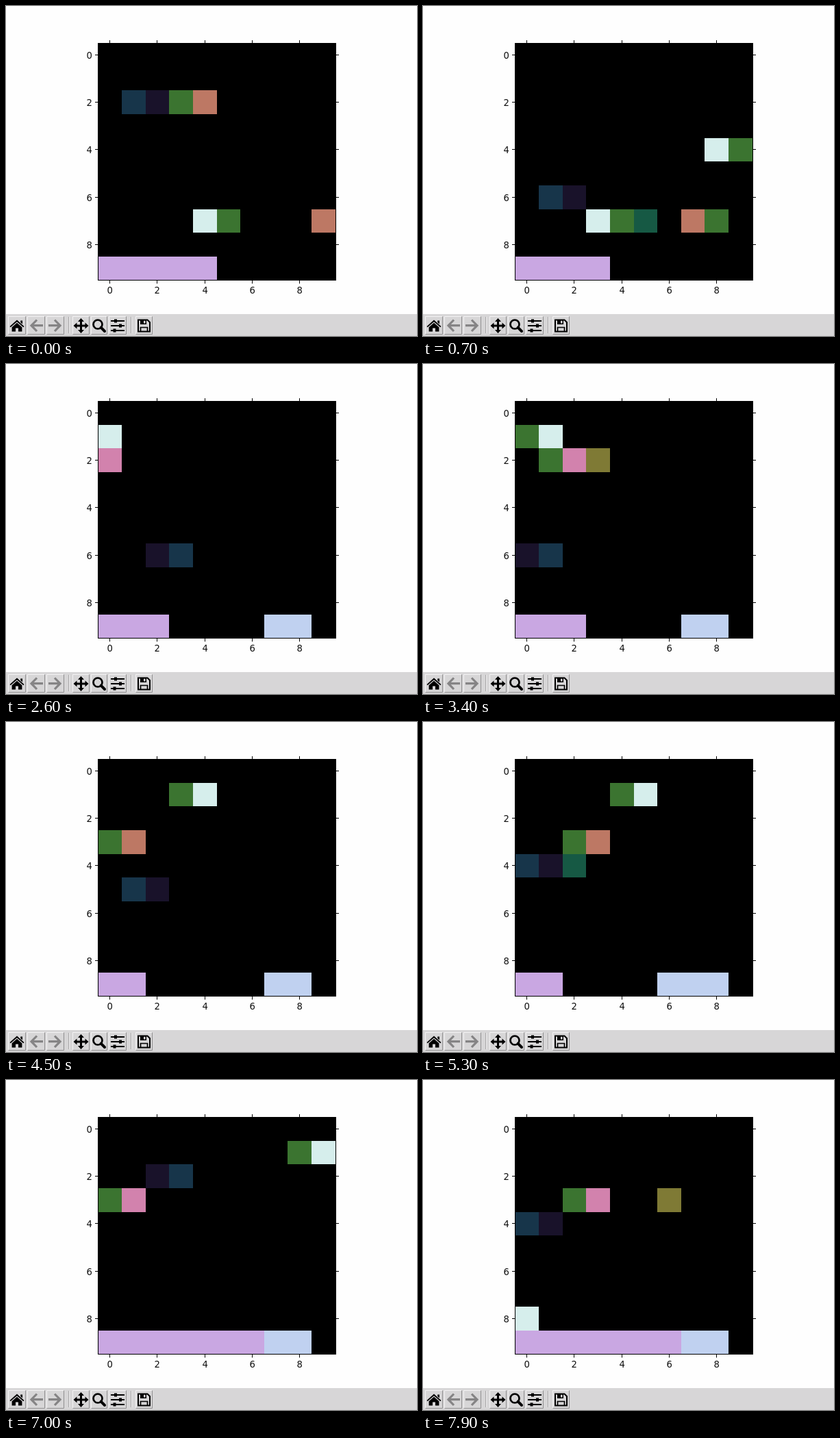
Animation, 600 px wide and 482 px high, one loop 8 s. Source, as an HTML page:

```html
<!DOCTYPE html>
<html lang="en">
<head>
<meta charset="utf-8">
<title>Grid game</title>
<style>
html, body { margin: 0; width: 100%; height: 100%; overflow: hidden; background: #fefefe; }
svg { display: block; width: 600px; height: 482px; }
text { font: 13.2px "DejaVu Sans", sans-serif; fill: #111; }
</style>
</head>
<body>
<svg viewBox="0 0 600 482">
  <rect x="134" y="54" width="348" height="347" shape-rendering="crispEdges"/>
  <g id="cells" shape-rendering="crispEdges"></g>
  <rect x="134.5" y="54.5" width="347" height="346" fill="none" stroke="#000"/>
  <g id="axes" stroke="#000"></g>
  <g id="labels"></g>
  <rect y="450" width="600" height="32" fill="#d7d6d7"/>
  <g id="buttons" fill="none"></g>
  <path d="M91.5 454V478M182.5 454V478" stroke="#a5a4a5"/>
  <path d="M92.5 454V478M183.5 454V478" stroke="#efeeef"/>
  <path d="M16 458.5L26.5 468L25.3 469.3L16 461.2L6.7 469.3L5.5 468ZM21.2 459.5H24V464.5L21.2 462ZM16 462.8L23.4 469.3V475.5H18V470.5H14V475.5H8.6V469.3Z"/>
  <g fill="none" stroke="#858485" stroke-width="3.2">
    <path d="M45 458.5L37 466.7L45 475M37.5 466.7H54"/>
    <path d="M71 458.5L79 466.7L71 475M78.5 466.7H62"/>
  </g>
  <path d="M109.5 456L114 461H111V465.5H115.5V462.5L120.5 467L115.5 471.5V468.5H111V473H114L109.5 478L105 473H108V468.5H103.500V471.5L98.500 467L103.500 462.5V465.500H108V461H105Z"/>
  <g fill="none" stroke="#000">
    <circle cx="134" cy="465" r="6.500" stroke-width="2.700"/>
    <path d="M138.700 469.700L144 475" stroke-width="4" stroke-linecap="round"/>
    <path d="M153 460H173M153 467H173M153 474H173" stroke-width="2"/>
    <path d="M160 457.500V462.500M167 464.500V469.500M158.500 471.500V476.500" stroke-width="4"/>
    <path d="M193 458.500H206.500L210 462V475.500H193Z" stroke-width="2"/>
    <path d="M196.500 475V469.500H206.500V475" stroke-width="1.700"/>
  </g>
  <path d="M196 458H205V465H196ZM201 459.500V463.500H203.500V459.500Z" fill-rule="evenodd"/>
</svg>
<script>
const TICK = 100, TICKS = 80, CELL = 34.65, LEFT = 134.25, TOP = 54;
const FRONT = 1, BACK = 2, SHOT = 3, TRAIL = 4, ENEMY_SHOT = 5,
      FISH = 6, ENEMY_SUB = 7, OXYGEN = 8, GAUGE = 9, DIVER = 10;
const COLORS = ['', '#19122a', '#17354a', '#165944', '#3b7430', '#7f7a35',
                '#bd7864', '#d282ad', '#c9a7e2', '#c0d1f0', '#d6eeec'];

// One command per tick: left, right, up, down or wait.
const MOVES = '.ddddd.u..' + 'd.urrr.r.u' + 'ullllddld.' + '.lu..uuuur' +
              '.r.dddllu.' + '...r.urr.r' + 'rl.u.uuldl' + 'dll..d.dr.';

// kind, row, column, direction, start, end, first move, ticks per move
const MOVERS = [
  [DIVER, 7, 4, -1, 0, 10, 3, 5],
  [DIVER, 4, 9, -1, 1, 20, 6, 5],
  [DIVER, 1, 0, 1, 25, 75, 30, 5],
  [DIVER, 8, 0, 1, 76, 80, 81, 5],
  [FISH, 2, 4, 1, 0, 1, 4, 4],
  [FISH, 7, 9, -1, 0, 9, 2, 4],
  [FISH, 3, 0, 1, 41, 58, 45, 4],
  [ENEMY_SUB, 2, 0, 1, 25, 41, 29, 4],
  [ENEMY_SUB, 3, 0, 1, 65, 80, 69, 4],
  [SHOT, 7, 3, 1, 5, 9, 6, 1],
  [SHOT, 4, 2, 1, 53, 61, 54, 1],
  [ENEMY_SHOT, 2, 3, 1, 34, 41, 35, 1],
  [ENEMY_SHOT, 3, 3, 1, 76, 80, 77, 1]
];

// [tick, value] from that tick on
const AIR = [[0, 5], [4, 4], [21, 3], [38, 2], [55, 1], [66, 10], [68, 9]];
const SAVED = [[0, 0], [10, 1], [20, 2], [51, 3], [66, 2]];

const byId = id => document.getElementById(id);
const at = (steps, t) => steps.filter(s => s[0] <= t).pop()[1];
const px = c => Math.round(LEFT + c * CELL);
const py = r => Math.round(TOP + r * CELL);

function player(t) {
  let x = 2, y = 2, dir = 1;
  for (const m of MOVES.slice(0, t + 1)) {
    if (m === 'l' || m === 'r') { dir = m === 'r' ? 1 : -1; x += dir; }
    if (m === 'u') y--;
    if (m === 'd') y++;
  }
  return [[FRONT, x, y], [BACK, x - dir, y]];
}

function scene(t) {
  const list = player(t);
  for (const [kind, row, col, dir, start, end, first, every] of MOVERS) {
    if (t < start || t >= end) continue;
    const n = t < first ? 0 : 1 + Math.floor((t - first) / every);
    const x = col + dir * n;
    list.push([kind, x, row]);
    if (kind >= FISH) list.push([TRAIL, x - dir, row]);
  }
  for (let i = 0; i < at(AIR, t); i++) list.push([OXYGEN, i, 9]);
  for (let i = 0; i < at(SAVED, t); i++) list.push([GAUGE, 8 - i, 9]);
  return list.filter(c => c[1] >= 0 && c[1] < 10).sort((a, b) => a[0] - b[0]);
}

function draw(t) {
  byId('cells').innerHTML = scene(t).map(([kind, x, y]) =>
    `<rect x="${px(x)}" y="${py(y)}" width="${px(x + 1) - px(x)}" ` +
    `height="${py(y + 1) - py(y)}" fill="${COLORS[kind]}"/>`).join('');
}

function drawFrame() {
  let ticks = '', labels = '', buttons = '';
  for (let i = 0; i < 10; i += 2) {
    const x = Math.floor(LEFT + (i + 0.5) * CELL) + 0.5;
    const y = Math.floor(TOP + (i + 0.5) * CELL) + 0.5;
    ticks += `M${x} 50V54M${x} 401V405.500M130 ${y}H134M482 ${y}H486`;
    labels += `<text x="${x + 0.3}" y="420" text-anchor="middle">${i}</text>` +
              `<text x="126" y="${y + 5}" text-anchor="end">${i}</text>`;
  }
  for (const [a, b] of [[3, 29], [31, 57], [59, 85], [97, 122], [124, 148], [150, 176], [189, 214]]) {
    buttons += `<path d="M${a + 0.5} 479.500V453.500H${b - 0.5}" stroke="#f4f3f4"/>` +
               `<path d="M${a + 0.5} 479.500H${b - 0.5}V453.500" stroke="#908f90"/>`;
  }
  byId('axes').innerHTML = `<path d="${ticks}"/>`;
  byId('labels').innerHTML = labels;
  byId('buttons').innerHTML = buttons;
}

let shown = -1;
const began = performance.now();
function loop() {
  const t = Math.floor((performance.now() - began) / TICK) % TICKS;
  if (t !== shown) draw(shown = t);
  requestAnimationFrame(loop);
}
drawFrame();
loop();
</script>
</body>
</html>
```
